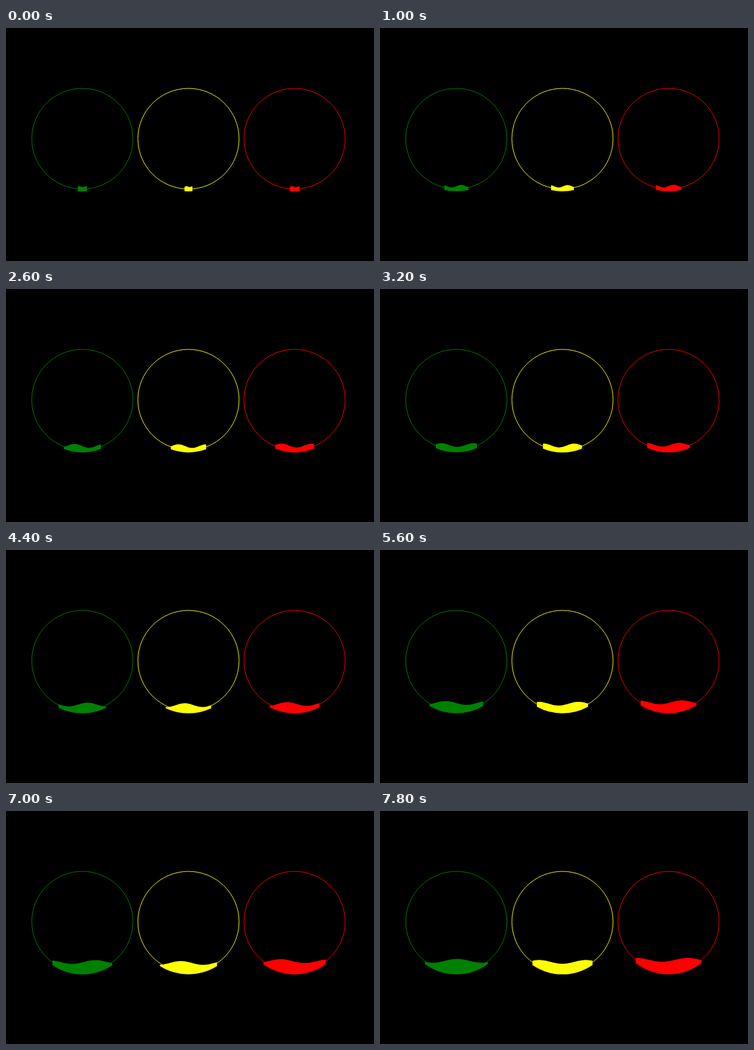
Write an HTML page with a canvas that moves like this. It is 600 px wide and 382 px high and loops after 8 s.

```html
<!DOCTYPE html>
<html lang="en">
<head>
<meta charset="utf-8">
<title>Filling gauges</title>
<style>
  html, body { margin: 0; width: 100%; height: 100%; overflow: hidden; background: #000; }
  canvas { display: block; }
</style>
</head>
<body>
<canvas id="stage" width="600" height="382"></canvas>
<script>
const ctx = document.getElementById('stage').getContext('2d');
const LOOP = 8000, STEP = 200;
const CY = 181.5, RING = 82.5, POOL = 86.3;
const WAVELENGTH = 0.78; // as a share of the pool's width
const CREST = 8.2;       // height above the pool's corners
const SLICES = 40;

// phase and drift are in wavelengths, drift per step.
const gauges = [
  { x: 124.5, color: '#008000', startHalf: 7.5, growth: 66.5, phase: 0.23, drift: 0.066 },
  { x: 297.5, color: '#ffff00', startHalf: 6.5, growth: 60.5, phase: 0.34, drift: 0.082 },
  { x: 470.5, color: '#ff0000', startHalf: 8, growth: 72, phase: 0.31, drift: 0.0845 }
];

function drawRing({ x, color }) {
  ctx.strokeStyle = color;
  ctx.lineWidth = 1;
  ctx.beginPath();
  ctx.arc(x, CY, RING, 0, Math.PI * 2);
  ctx.stroke();
}

function drawPool({ x, color, startHalf, growth, phase, drift }, step) {
  // The squared half-width grows evenly as the level rises.
  const half = Math.sqrt(startHalf ** 2 + growth * step);
  const cornerY = CY + Math.sqrt(POOL ** 2 - half ** 2);
  const angle = Math.asin(half / POOL);
  const amplitude = 3.1 * Math.min(1, half / 30);
  const crestAt = phase - drift * step;

  ctx.fillStyle = color;
  ctx.beginPath();
  for (let i = 0; i <= SLICES; i++) {
    const u = i / SLICES;
    const wave = Math.cos(2 * Math.PI * (u / WAVELENGTH - crestAt));
    const height = CREST - amplitude * (1 - wave);
    ctx.lineTo(x + half * (2 * u - 1), cornerY - height);
  }
  ctx.arc(x, CY, POOL, Math.PI / 2 - angle, Math.PI / 2 + angle);
  ctx.fill();
}

function draw(time) {
  const step = Math.floor((time % LOOP) / STEP);
  ctx.fillStyle = '#000';
  ctx.fillRect(0, 0, 600, 382);
  for (const gauge of gauges) {
    drawRing(gauge);
    drawPool(gauge, step);
  }
}

const startTime = performance.now();
function tick() {
  draw(performance.now() - startTime);
  requestAnimationFrame(tick);
}
tick();
</script>
</body>
</html>
```
